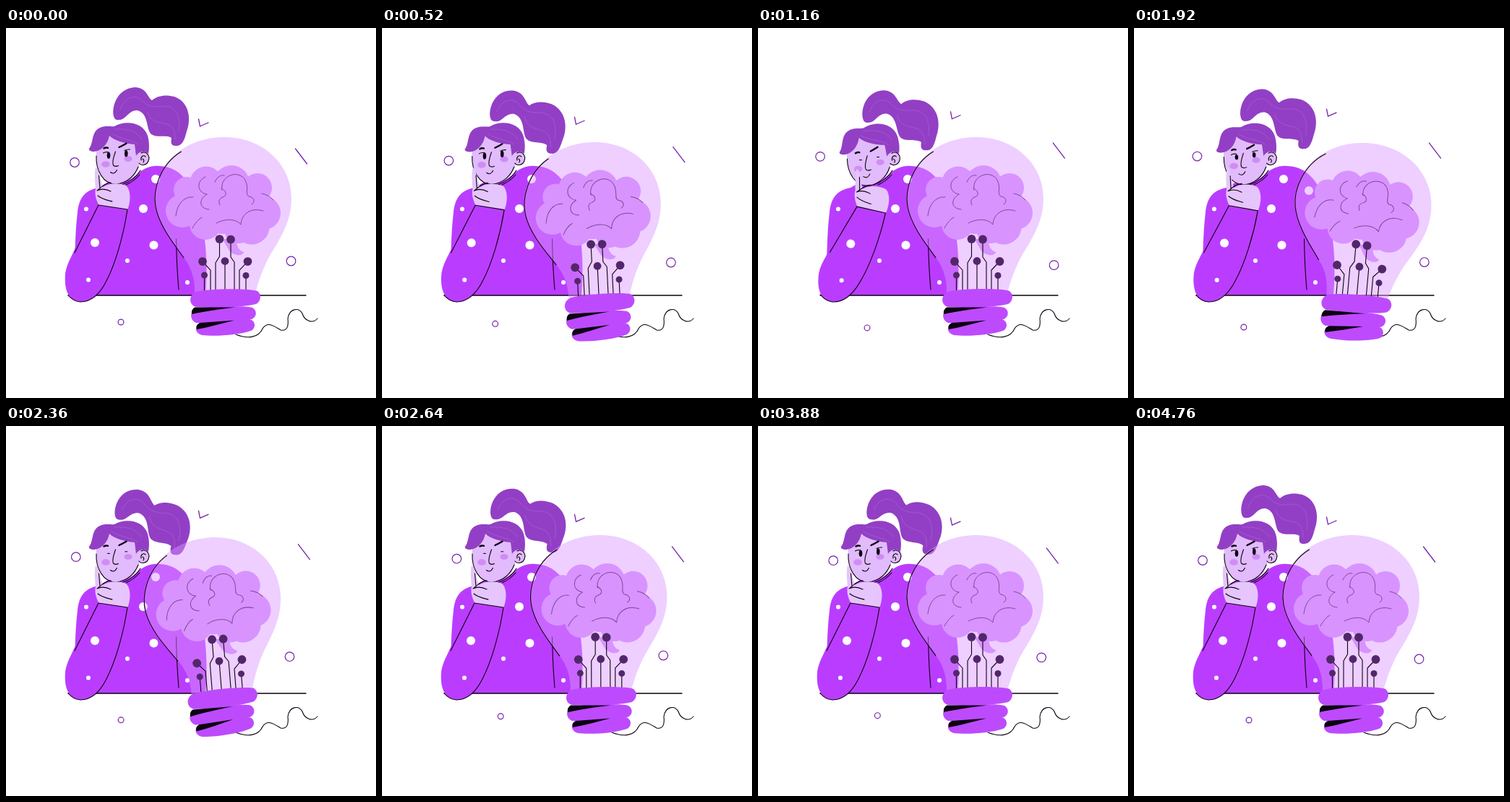
An HTML page with a canvas for the animation above (4800 ms loop, 512 by 512 pixels).

```html
<!DOCTYPE html>
<html lang="en">
<head>
<meta charset="utf-8">
<title>Bright idea</title>
<style>
html, body { margin: 0; width: 100%; height: 100%; overflow: hidden; background: #fff; }
canvas { display: block; width: 512px; height: 512px; }
</style>
</head>
<body>
<canvas id="stage" width="512" height="512"></canvas>
<script>
const ctx = document.getElementById('stage').getContext('2d');
const LOOP = 4800;
const C = {
  sweater: '#ba3dff', hair: '#923fc5', strand: '#a65bd4', skin: '#e1bbfb', hand: '#e5c5fc',
  cheek: '#d08cf6', glass: 'rgba(218,150,255,.46)', brain: '#d893ff', fold: '#7d4a99',
  socket: '#bd4bfd', node: '#51276a', ring: '#7420ad', ink: '#0c0212'
};

function fill(d, color) {
  ctx.fillStyle = color;
  ctx.fill(new Path2D(d));
}
function stroke(d, color = C.ink, width = 1.1) {
  ctx.strokeStyle = color;
  ctx.lineWidth = width;
  ctx.stroke(new Path2D(d));
}
function oval(x, y, rx, ry, color) {
  ctx.beginPath();
  ctx.ellipse(x, y, rx, ry, 0, 0, Math.PI * 2);
  ctx.fillStyle = color;
  ctx.fill();
}
const dot = (x, y, r, color = '#fff') => oval(x, y, r, r, color);
function ring(x, y, r) {
  ctx.beginPath();
  ctx.arc(x, y, r, 0, Math.PI * 2);
  ctx.strokeStyle = C.ring;
  ctx.lineWidth = 1.2;
  ctx.stroke();
}
function group(draw) {
  ctx.save();
  draw();
  ctx.restore();
}
function turn(px, py, degrees, dx = 0, dy = 0) {
  ctx.translate(px + dx, py + dy);
  ctx.rotate(degrees * Math.PI / 180);
  ctx.translate(-px, -py);
}

// Sine-eased interpolation between [time, value, value...] keys.
function track(t, keys) {
  let i = 1;
  while (i < keys.length - 1 && t > keys[i][0]) i++;
  const a = keys[i - 1], b = keys[i];
  const s = Math.min(1, Math.max(0, (t - a[0]) / (b[0] - a[0])));
  const e = (1 - Math.cos(Math.PI * s)) / 2;
  return a.slice(1).map((v, n) => v + (b[n + 1] - v) * e);
}

function ornaments(t) {
  const [lx, ly] = track(t, [[0, 95, 186], [1560, 84.5, 176.4], [3200, 110, 186.3], [LOOP, 95, 186]]);
  ring(lx, ly, 6.3);
  const [bx, by] = track(t, [[0, 159, 407], [1560, 149.6, 416.3], [3200, 169.3, 396.7], [LOOP, 159, 407]]);
  ring(bx, by, 3.9);
  const [rx, ry] = track(t, [[0, 394.5, 322.5], [1300, 410, 328.3], [2750, 389, 317.4], [LOOP, 394.5, 322.5]]);
  ring(rx, ry, 6.3);
  const [sx, sy] = track(t, [[0, 0, 0], [1560, 9.3, -9.4], [3200, -2.1, 3.2], [LOOP, 0, 0]]);
  group(() => {
    ctx.translate(sx, sy);
    stroke('M400.5 167L416.5 188', C.ring, 1.3);
  });
  const [cy] = track(t, [[0, 0], [1800, -14.2], [3200, 1.8], [LOOP, 0]]);
  group(() => {
    ctx.translate(0, cy);
    stroke('M266.5 126L268.5 136L280 131', C.ring, 1.3);
  });
}

function torso() {
  fill(`M128 221C108 225 101 236 99 255C96 280 96 300 95 320L110 370H276C279 335 278 300 270 262
    C262 225 247 192 212 191C200 190 190 195 183 201C170 215 150 217 140 214Z`, C.sweater);
  [[207, 209, 6], [190, 250, 6], [242, 225, 6], [204.5, 300.5, 6], [168, 322, 3], [251, 352, 3], [111, 250.5, 3]]
    .forEach(d => dot(...d));
  stroke('M235.5 292C236 318 237 340 239 362');
}

function ponytail(k) {
  group(() => {
    ctx.transform(1, .16 * k, -.08 * k, 1, 11.6 * k, -22.4 * k);
    fill(`M149 122C146 110 153 84 178 82C195 82 196 97 202 100C210 93 222 92 233 95
      C255 103 256 128 250 143C247 155 244 163 236 163C228 164 228 158 229 152
      C222 147 207 153 200 146C194 138 197 118 182 114C170 113 166 127 157 127C152 128 150 126 149 122Z`, C.hair);
    stroke('M158 113C164 95 180 90 190 102C199 111 209 109 220 108C236 109 242 123 239 143', C.strand, .8);
    stroke('M196 116C201 132 212 130 222 133C232 135 234 145 234 154', C.strand, .8);
  });
}

function face(lean, eye) {
  ctx.translate(1.5 * lean, 3.5 * lean);
  oval(138, 188.5, 5.8, 4.3, C.cheek);
  oval(169, 181, 5.6, 4, C.cheek);
  stroke('M135.5 166.5Q138 164.8 141 165.8', C.ink, 2.4);
  stroke('M156.5 165Q161 163 166.5 159.8', C.ink, 2.4);
  oval(142, 176.3, 2.3, .6 + 4 * eye, C.ink);
  oval(166.3, 173.8, 2.3, .6 + 4 * eye, C.ink);
  if (eye > .4) {
    stroke('M134.5 173Q138 170.8 142 172M164 169.5Q167 167.8 171.5 168');
  }
  stroke('M151.5 171C149 178 147 187 148.5 190Q151.5 192.5 155.5 190.5');
  stroke('M144.5 199.5Q150 203.5 153.5 196.5');
}

function head(t, lean, eye) {
  group(() => {
    turn(175, 205, -3.5 * lean, 0, lean);
    ponytail((1 - Math.cos(t / 1600 * Math.PI * 2)) / 2);
    fill('M125 168C123 190 132 215 151 216C168 216 179 205 184 192L190 160L150 140Z', C.skin);
    dot(189.5, 181, 8.8, C.skin);
    stroke('M125 177C124 196 134 216 152 216C167 215 178 205 183 192');
    stroke('M187 173C194 169 200 177 197 184C195 190 187 191 184 187M187 183C186 178 190 175 193 178M189 181Q192 183 190 186');
    fill(`M115 167C121 160 118 145 128 139C136 134 146 137 150 136C165 127 190 130 196 149
      C199 160 198 169 197 174C190 168 183 172 180 177L178 161C165 160 150 156 143 149
      C141 160 133 170 122 171C117 171 114 169 115 167Z`, C.hair);
    stroke('M146 146C159 154 174 154 183 161M150 140C169 139 181 143 188 154', C.strand, .8);
    face(lean, eye);
  });
  stroke('M186 197C180 207 172 213 160 217M185 203C179 210 173 214 166 217');
}

function arm(lean) {
  group(() => {
    turn(103, 372, 4.2 * lean);
    fill(`M124 193C122 200 123 211 124 222C122 232 126 240 129 246L168 252C173 240 173 224 166 218
      C156 214 143 214 134 220L129 203Q127 192 124 193Z`, C.hand);
    stroke('M128.5 204L130 222M126 225C132 220 138 214 145 214M126 225C132 222 139 223 145 226M127 232C133 237 139 238 147 240');
    fill(`M128 245L168 251C163 285 152 325 139 350C128 372 115 379 103 379
      C88 379 80 364 82 340C84 325 94 311 98 299Z`, C.sweater);
    stroke('M95 311L128 245L168 251C163 285 152 325 139 350C128 372 115 379 103 379Q93 378 86 370');
    dot(123, 297, 6);
    dot(114, 348.5, 3);
  });
}

function brain() {
  ctx.beginPath();
  [[250, 224, 18], [277, 214, 22.5], [312, 215, 25], [348, 221, 20], [244, 253, 23], [357, 256, 23],
   [340, 275, 24.5], [276, 271, 22], [322, 278, 20], [300, 243, 42]].forEach(([x, y, r]) => {
    ctx.moveTo(x + r, y);
    ctx.arc(x, y, r, 0, Math.PI * 2);
  });
  ctx.fillStyle = C.brain;
  ctx.fill();
  fill('M299 292C307 302 307 310 316 313C323 316 329 313 329 310C322 308 319 302 319 292Z', C.brain);
  stroke(`M299 224C295 202 328 193 333 216C335 224 331 230 336 233C344 234 345 241 340 244
    M276 206C263 211 264 228 278 230M278 230C266 237 267 250 281 251
    M289 213C292 206 297 203 302 204M298 222C306 226 306 232 300 234C294 236 294 241 296 245
    M235 260C237 242 247 233 259 234M258 277C262 269 267 264 271 262
    M291 270C302 264 318 263 325 272C326 256 340 248 356 253M354 229Q364 231 370 238`, C.fold, 1);
}

function circuits() {
  stroke(`M295.5 292V316L290 325V364M311 292V317L316 324V364M272 323L283 335V364M303 323V364
    M334.5 323L323 335V364M274.5 342V364M332 342V364`, C.ink, 1.1);
  [[295.5, 292, 5.9], [311, 292.5, 5.9], [272, 323, 5.9], [303, 322.5, 5.4], [334.5, 323, 5.9],
   [274.5, 342, 4.5], [332, 342.5, 4.5]].forEach(d => dot(...d, C.node));
}

function socket() {
  fill('M263 365C280 360 340 360 348 364C354 369 353 378 346 382C325 387 282 387 263 386C252 383 253 369 263 365Z', C.socket);
  fill('M262 389C280 384 333 384 341 387C348 391 347 400 340 403C322 408 282 408 263 408C254 404 254 393 262 389Z', C.socket);
  fill('M269 408C288 402 330 401 340 404C346 408 345 416 339 419C322 425 290 427 271 425C261 422 260 412 269 408Z', C.socket);
  fill('M261 386.5L317 386.5C296 389 275 392 257 396Q256 390 261 386.5Z', C.ink);
  fill('M268 408L316 404.5C298 409 281 414 264 417Q262 411 268 408Z', C.ink);
}

// The bulb dips once while rocking right, then left.
function bulb(t) {
  const u = t < 1720 ? t : t - 1720;
  const [angle] = track(u, [[0, 0], [215, 5.2], [640, -4.6], [960, 0]]);
  const dip = u < 700 ? 9.4 * Math.sin(Math.PI * u / 700) : 0;
  group(() => {
    turn(303, 422, angle, 0, dip);
    fill(`M261 367C262 343 253 326 246 318C236 304 222 288 213 268C207 254 205 244 205 236
      C207 185 250 151 302 151C355 151 395 188 395 236C395 275 372 300 360 325C352 342 348 355 345 367Z`, C.glass);
    stroke('M242.5 171C212 190 203 225 207 247C212 275 235 302 246 318');
    brain();
    circuits();
    socket();
  });
}

function draw(t) {
  ctx.fillStyle = '#fff';
  ctx.fillRect(0, 0, 512, 512);
  ctx.lineCap = ctx.lineJoin = 'round';
  const [lean] = track(t, t < 1400 ? [[300, 0], [1250, 1]] : [[1400, 1], [2300, 0]]);
  const [eye] = track(t, [[0, 1], [640, 1], [900, 0], [1500, 0], [1920, .75], [2300, 0], [3200, 0], [3600, 1], [LOOP, 1]]);

  ornaments(t);
  stroke(`M318 424C335 431 350 428 355 416C362 405 372 413 380 418C390 420 391 411 390 402
    C392 388 405 386 410 395C413 405 424 410 431 402`);
  torso();
  stroke('M86 370H415', C.ink, 1.3);
  head(t, lean, eye);
  arm(lean);
  bulb(t);
}

function tick() {
  draw(performance.now() % LOOP);
  requestAnimationFrame(tick);
}
tick();
</script>
</body>
</html>
```
